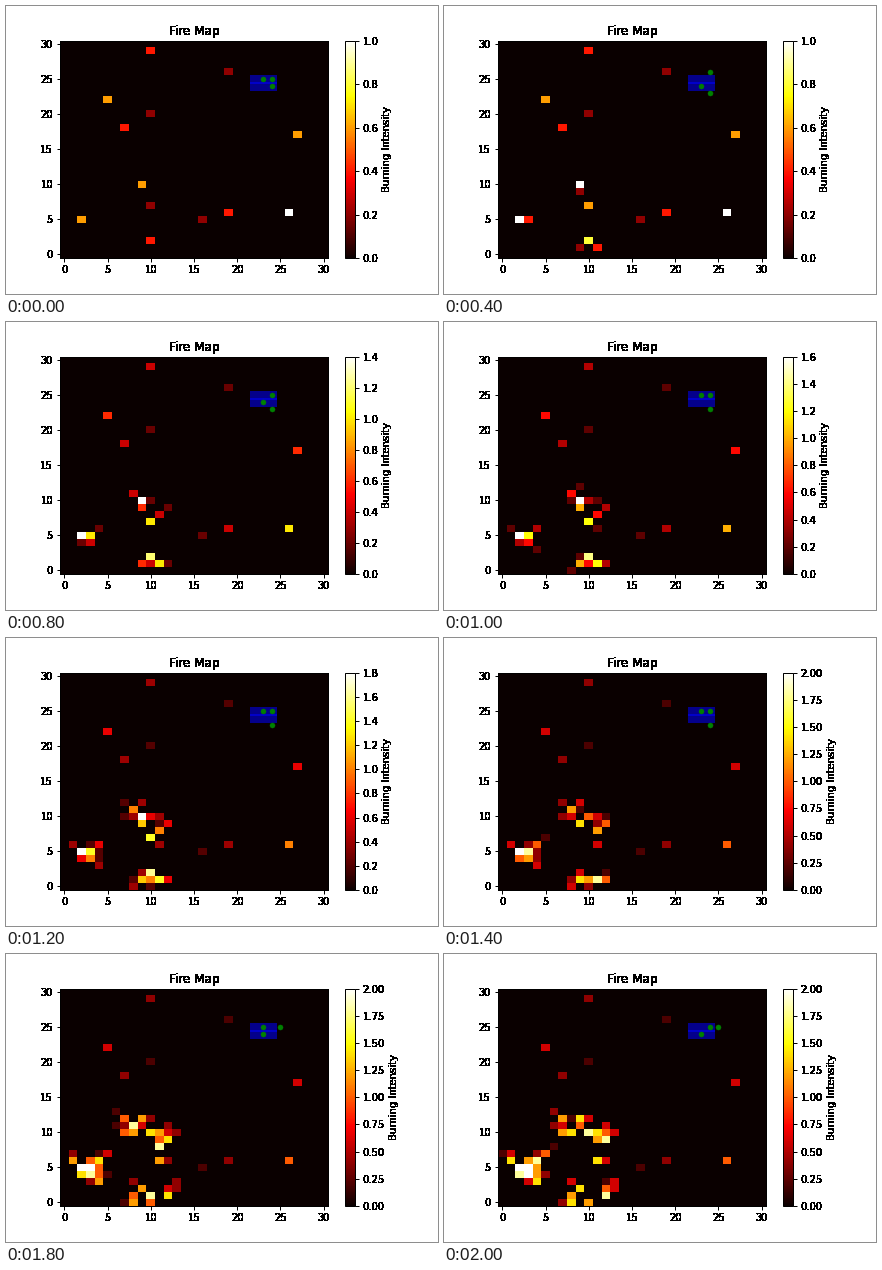
A matplotlib script that plays this animation: 432 by 288 pixels, repeating every 2.2 s.

```python
import numpy as np
import matplotlib.pyplot as plt
from matplotlib.animation import FuncAnimation
from matplotlib.text import Text

SIZE, STEPS = 31, 11
UNIT, MAX_HEAT = 0.2, 10   # intensity of one heat unit, hottest level
PACE = 3                   # steps before an ember leaps to the next cell
LIFE = 7                   # steps until a cell has burnt out
WOODS_X = 5                # cells left of this column never burn out

HEADINGS = {"N": (0, 1), "S": (0, -1), "E": (1, 0), "W": (-1, 0),
            "NE": (1, 1), "NW": (-1, 1), "SE": (1, -1), "SW": (-1, -1)}

# x, y, heat
STEADY = [(10, 29, 2), (19, 26, 1), (5, 22, 3), (10, 20, 1), (7, 18, 2),
          (27, 17, 3), (16, 5, 1), (19, 6, 2), (26, 6, 5)]
SEEDS = [(9, 10, 3), (10, 7, 1), (2, 5, 3), (10, 2, 2)]

# x, y, first step, heading
EMBERS = [
    (9, 9, 2, "NW"), (8, 11, 3, "NW"), (10, 10, 4, "NW"), (7, 10, 6, "NW"),
    (11, 8, 3, "N"), (12, 9, 4, "N"), (9, 12, 5, "E"), (11, 10, 5, "NE"),
    (13, 10, 8, "E"), (11, 6, 5, "E"),
    (3, 5, 1, "NE"), (3, 4, 3, "E"), (2, 4, 4, "E"), (4, 3, 5, "W"),
    (4, 5, 6, "SE"), (3, 6, 6, "NE"), (1, 6, 5, "N"), (1, 6, 7, "NW"),
    (11, 1, 1, "W"), (9, 1, 2, "SW"), (10, 1, 3, "S"), (9, 2, 5, "NW"),
    (8, 1, 6, "SW"), (12, 1, 4, "N"), (12, 1, 5, "NE"), (13, 3, 8, "S"),
]


def ignition_steps():
    """Step at which an ember first reaches each cell."""
    born = np.full((SIZE, SIZE), STEPS)
    for x, y, step, heading in EMBERS:
        dx, dy = HEADINGS[heading]
        while step < STEPS and min(x, y) >= 0:
            born[y, x] = min(born[y, x], step)
            x, y, step = x + dx, y + dy, step + PACE
    return born


BORN = ignition_steps()
WOODS = np.arange(SIZE) < WOODS_X


def fire_map(k):
    age = k - BORN
    alive = (age >= 0) & ((age < LIFE) | WOODS)
    heat = np.where(alive, 1 + age * 4 // 3, 0)
    for x, y, start in SEEDS:
        heat[y, x] = start + k if k < LIFE or WOODS[x] else 0
    for x, y, level in STEADY:
        heat[y, x] = level
    return np.minimum(heat, MAX_HEAT) * UNIT


def walk(start, moves):
    """Positions of one agent; moves maps a step to a heading."""
    path, pos = [], np.array(start)
    for k in range(STEPS):
        if k in moves:
            pos = pos + HEADINGS[moves[k]]
        path.append(pos)
    return path


agents = np.array([
    walk((23, 25), {1: "S", 5: "N", 8: "S", 9: "N", 10: "E"}),
    walk((24, 25), {2: "N", 3: "S", 8: "E"}),
    walk((24, 24), {2: "S", 8: "W", 9: "N"}),
])

plt.rcParams.update({"axes.linewidth": 1, "xtick.major.width": 1,
                     "ytick.major.width": 1})
fig = plt.figure(figsize=(6, 4), dpi=72, facecolor="white")
fig.subplots_adjust(left=0.125, right=0.9, bottom=0.125, top=0.88)
ax = fig.add_subplot()
image = ax.imshow(fire_map(0), cmap="hot", origin="lower", aspect="auto",
                  interpolation="nearest", vmin=0, vmax=1)
bar = fig.colorbar(image, ax=ax)
bar.set_label("Burning Intensity")
ax.set_title("Fire Map")

water_x, water_y = np.meshgrid([22, 23, 24], [24, 25])
ax.scatter(water_x, water_y, s=81, marker="s", c="blue", alpha=0.55,
           linewidths=0)
dots, = ax.plot([], [], "o", color="green", markersize=5, markeredgewidth=0.5)
ax.set(xlim=(-0.5, 30.5), ylim=(-0.5, 30.5),
       xticks=range(0, SIZE, 5), yticks=range(0, SIZE, 5))


def hard_edges(img, dpi):
    """Turn every touched pixel of a text solid black."""
    img[..., :3] = 0
    img[..., 3] = img[..., 3] > 0.03
    return img, 0, 0


def update(k):
    heat = fire_map(k)
    image.set_data(heat)
    image.set_clim(0, heat.max())
    dots.set_data(agents[:, k, 0], agents[:, k, 1])
    bar.ax.get_yticklabels()  # builds the ticks before they are styled
    for text in fig.findobj(Text):
        text.set_agg_filter(hard_edges)
    return image, dots


anim = FuncAnimation(fig, update, frames=STEPS, interval=200,
                     init_func=lambda: update(0), repeat=True, repeat_delay=0)
plt.show()
```
